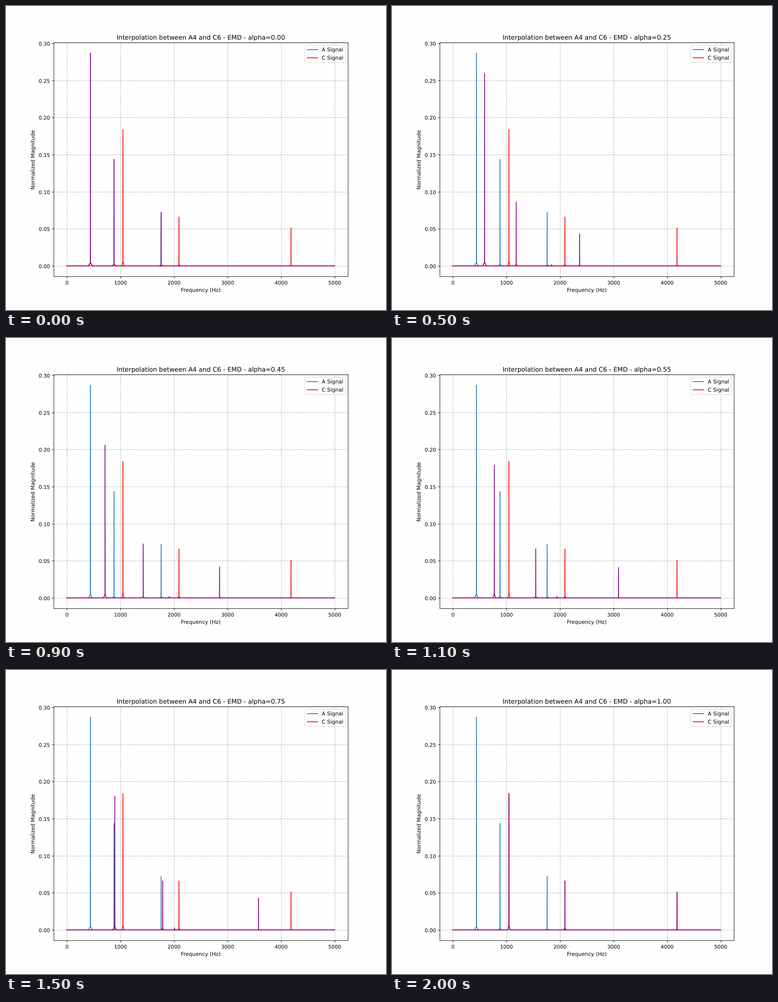
These frames come from a looping animation (837x669 px, 2100 ms). An HTML page:

```html
<!DOCTYPE html>
<html lang="en">
<head>
<meta charset="utf-8">
<title>Spectrum interpolation</title>
<style>
  html, body { margin: 0; width: 100%; height: 100%; overflow: hidden; background: #fefefe; }
  svg { display: block; }
  text { font: 11.6px "DejaVu Sans", sans-serif; text-rendering: geometricPrecision; }
  .title { font-size: 13.95px; }
  .tick { font-size: 11.2px; }
  .mid { text-anchor: middle; }
  .end { text-anchor: end; }
  .grid { stroke: #b0b0b0; stroke-width: .93; stroke-dasharray: 3.44 1.49; }
  .axis { fill: none; stroke: #000; stroke-width: .93; }
  .line { fill: none; stroke-width: 1.74; stroke-linejoin: round; stroke-linecap: square; }
</style>
</head>
<body>
<svg id="plot" width="837" height="669" viewBox="0 0 837 669"></svg>
<script>
const plot = document.getElementById('plot');
const STEP_MS = 100, STEPS = 21;
const BLUE = '#1f77b4', RED = '#ff0000', PURPLE = '#800080';

const px = hz => 134.1 + hz * 0.11794;
const py = value => 572 - value * 1633;
const snap = n => Math.round(n) + .5;
const lerp = (a, b, t) => a + (b - a) * t;
const LEFT = snap(104.6), RIGHT = snap(753.3), TOP = snap(80.3), BOTTOM = snap(595.4);

function add(tag, attrs, text) {
  const node = document.createElementNS('http://www.w3.org/2000/svg', tag);
  for (const key in attrs) node.setAttribute(key, attrs[key]);
  if (text) node.textContent = text;
  return plot.appendChild(node);
}
const addLine = (x1, y1, x2, y2, cls, stroke) =>
  add('line', { x1, y1, x2, y2, class: cls, ...(stroke && { stroke }) });
const addText = (x, y, cls, text, extra) => add('text', { x, y, class: cls, ...extra }, text);

// A peak is a thin spike of height h on a foot of height h * foot; a higher curve makes the foot steeper.
const peak = (hz, h, foot, curve) => ({ hz, h, foot, curve });
const peaksA = [peak(440, .2867, .018, 1), peak(880, .1435, .018, 1), peak(1760, .072, .018, 1)];
const peaksC = [peak(1046.5, .184, .06, 3), peak(2093, .066, .06, 3), peak(4186, .051, .02, 2)];

// Heights the moving peaks pass through once the merged bins spread, and after they have separated.
const SPREAD = { alpha: .15, heights: [.2865, .093, .044] };
const SEPARATE = { alpha: .55, heights: [.179, .066, .041] };
const GATHERED = .9;

function height(i, alpha) {
  const early = SPREAD.heights[i], late = SEPARATE.heights[i];
  const progress = (from, to) => Math.min(1, (alpha - from) / (to - from));
  if (alpha < SPREAD.alpha) return lerp(peaksA[i].h, early, progress(0, SPREAD.alpha));
  if (alpha < SEPARATE.alpha) return lerp(early, late, progress(SPREAD.alpha, SEPARATE.alpha));
  return lerp(late, peaksC[i].h, progress(SEPARATE.alpha, GATHERED) ** 3);
}

function movingPeaks(alpha) {
  const peaks = peaksA.map((a, i) => {
    const c = peaksC[i];
    return peak(lerp(a.hz, c.hz, alpha), height(i, alpha),
      lerp(a.foot, c.foot, alpha), lerp(a.curve, c.curve, alpha));
  });
  // Leftover energy drifts from the third A peak to the second C peak.
  const leftover = peak(lerp(1760, 2093, alpha), .0015 + .002 * alpha ** 2, .5, 2);
  return [...peaks, leftover];
}

const FOOT_WIDTH = 4.5, SPIKE_WIDTH = .15;

function spectrum(peaks) {
  const points = [[px(0), py(0)]];
  for (const { hz, h, foot, curve } of peaks) {
    for (let k = -6; k <= 6; k++) {
      const near = 1 - Math.abs(k) / 6;
      const dx = Math.sign(k) * lerp(FOOT_WIDTH, SPIKE_WIDTH, near * 6 / 5);
      points.push([px(hz) + dx, py(k ? h * foot * near ** curve : h)]);
    }
  }
  points.push([px(5000), py(0)]);
  return 'M' + points.map(p => p.map(n => n.toFixed(2)).join(' ')).join('L');
}

for (let hz = 0; hz <= 5000; hz += 1000) {
  const x = snap(px(hz));
  addLine(x, BOTTOM, x, TOP, 'grid');
  addLine(x, BOTTOM, x, BOTTOM + 4.1, 'axis');
  addText(px(hz) + .2, 612.8, 'tick mid', String(hz));
}
for (let i = 0; i <= 6; i++) {
  const value = i * .05, y = snap(py(value));
  addLine(LEFT, y, RIGHT, y, 'grid');
  addLine(LEFT - 4.1, y, LEFT, y, 'axis');
  addText(97, y + 4.2, 'tick end', value.toFixed(2));
}

const drawSpectrum = (peaks, stroke) => add('path', { class: 'line', stroke, d: spectrum(peaks) });
drawSpectrum(peaksA, BLUE);
drawSpectrum(peaksC, RED);
const moving = drawSpectrum(peaksA, PURPLE);

add('rect', { x: LEFT, y: TOP, width: RIGHT - LEFT, height: BOTTOM - TOP, class: 'axis' });
addText(429, 629, 'mid', 'Frequency (Hz)');
addText(0, 0, 'mid', 'Normalized Magnitude', { transform: 'translate(63 338.5) rotate(-90)' });
const title = addText(429, 73.8, 'title mid');

add('rect', { x: 658.5, y: 86.5, width: 89, height: 38, rx: 2.3,
  fill: '#fefefe', 'fill-opacity': .8, stroke: '#ccc', 'stroke-opacity': .8 });
[['A Signal', BLUE], ['C Signal', RED]].forEach(([label, color], i) => {
  const y = 96 + i * 18;
  addLine(663.4, y, 686.2, y, 'line', color);
  addText(695.6, y + 4, '', label);
});

let shown = -1;
function render(ms) {
  const step = Math.floor(ms / STEP_MS) % STEPS;
  if (step === shown) return;
  shown = step;
  const alpha = step / (STEPS - 1);
  title.textContent = `Interpolation between A4 and C6 - EMD - alpha=${alpha.toFixed(2)}`;
  moving.setAttribute('d', spectrum(movingPeaks(alpha)));
}

const start = performance.now();
function tick() {
  render(performance.now() - start);
  requestAnimationFrame(tick);
}
tick();
</script>
</body>
</html>
```
